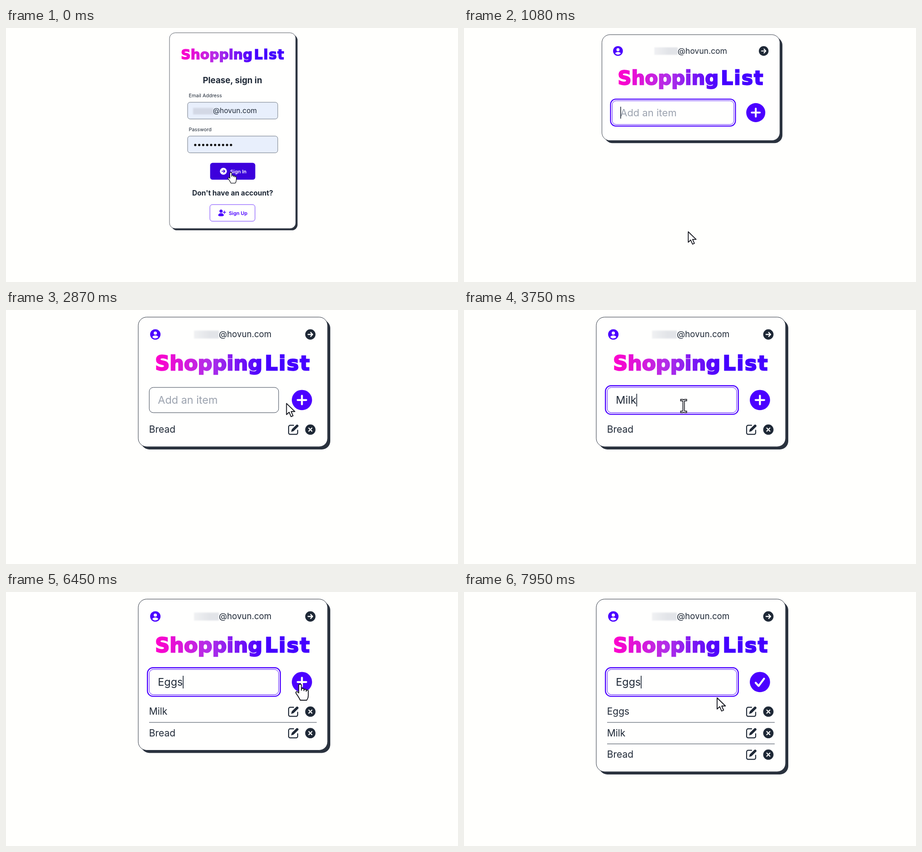
These frames come from a looping animation (998x561 px, 8000 ms). An HTML page:

```html
<!DOCTYPE html>
<html lang="en">
<head>
<meta charset="utf-8">
<title>Shopping List</title>
<style>
  html, body { margin: 0; width: 100%; height: 100%; overflow: hidden; background: #fffffd; }
  svg { display: block; width: 100vw; height: 100vh; }
  text { font-family: Inter, sans-serif; font-optical-sizing: none; fill: #1f2937; white-space: pre; }
  .title { font: bold 44.5px "DejaVu Sans", sans-serif; fill: url(#ink); stroke: url(#ink); stroke-width: 2.5; }
  .loose { letter-spacing: 2.5px; }
  .card { fill: #fffffe; stroke: #2a323e; }
  .shadow { fill: #2a323e; }
  .dark { fill: #1f2937; }
  .purple { fill: #4b00ff; }
  .white { fill: #fffffe; }
  .line { fill: none; stroke: #fffffe; stroke-linecap: round; stroke-linejoin: round; }
  .field { fill: #e8effc; stroke: #4b5563; stroke-width: .8; }
  .bold { font-weight: 700; text-anchor: middle; }
  .small { font-size: 10.9px; }
  .pointer { fill: #fffffe; stroke: #15171f; stroke-width: 1.9; stroke-linejoin: round; }
</style>
</head>
<body>
<svg viewBox="0 0 998 561">
  <defs>
    <linearGradient id="ink" gradientUnits="userSpaceOnUse" x1="331" x2="672" y1="0" y2="0">
      <stop offset="0" stop-color="#ff00cc"/>
      <stop offset=".34" stop-color="#b32fe8"/>
      <stop offset=".7" stop-color="#4500ff"/>
    </linearGradient>
    <linearGradient id="veil">
      <stop offset="0" stop-color="#f0f1f3"/>
      <stop offset=".6" stop-color="#e2e4e8"/>
    </linearGradient>
    <filter id="soft" x="-20%" y="-40%" width="140%" height="180%"><feGaussianBlur stdDeviation="1.4"/></filter>
    <g id="title">
      <text class="title" x="329.3" y="132.5">Shopping</text>
      <text class="title loose" x="571.5" y="132.5">List</text>
    </g>
    <path id="arrowRight" d="M-5 0H5M.8-4.4 5 0 .8 4.4" fill="none" stroke-linecap="round" stroke-linejoin="round"/>
    <g id="edit">
      <path d="M1-9.5H-6.5A3.5 3.5 0 0 0-10-6V7A3.5 3.5 0 0 0-6.5 10.5H6.5A3.5 3.5 0 0 0 10 7V1.5" fill="none" stroke="#1f2937" stroke-width="2.2" stroke-linecap="round"/>
      <path class="dark" d="M-4.5 5-3-.8 6.8-10.3Q9-12 11-10T10.8-6.2L1 3.4Z"/>
    </g>
    <g id="remove">
      <circle class="dark" r="11.4"/>
      <path class="line" stroke-width="2.3" d="M-3.4-3.4 3.4 3.4M3.4-3.4-3.4 3.4"/>
    </g>
    <path id="beamShape" d="M-5-13H-3Q0-13 0-10V10Q0 13-3 13H-5M5-13H3Q0-13 0-10M0 10Q0 13 3 13H5" fill="none" stroke-linecap="square"/>
  </defs>

  <g id="camera">
    <g id="signIn" transform="translate(500.5) scale(1.5) translate(-500.5)">
      <rect class="shadow" x="365" y="14.5" width="278.7" height="432.3" rx="12.5"/>
      <rect class="card" stroke-width=".8" x="361" y="10.6" width="278.7" height="432.3" rx="12.5"/>
      <use href="#title" transform="translate(500.5) scale(.6667) translate(-500.5 -28.5)"/>
      <text class="bold" font-size="18.7" x="500" y="122">Please, sign in</text>
      <text class="small" x="403.5" y="153">Email Address</text>
      <rect class="field" x="401" y="164" width="199" height="37" rx="5.5"/>
      <rect x="413" y="176.5" width="45" height="14.5" fill="#d3d8e5" filter="url(#soft)"/>
      <text font-size="15.6" x="457" y="188">@hovun.com</text>
      <text class="small" x="403.5" y="228">Password</text>
      <rect class="field" x="401" y="238.7" width="199" height="37" rx="5.5"/>
      <path d="M417.9 258.3h80" stroke="#111" stroke-width="5.2" stroke-linecap="round" stroke-dasharray="0 8.77"/>
      <rect x="450.7" y="297.8" width="99.7" height="37.3" rx="5.5" fill="#3d00dc"/>
      <circle class="white" cx="480" cy="316.4" r="7.7"/>
      <use href="#arrowRight" transform="translate(480 316.4) scale(.66)" stroke="#3d00dc" stroke-width="2.5"/>
      <text class="small" font-weight="600" x="495" y="320.6" style="fill:#fff">Sign In</text>
      <text class="bold" font-size="15.6" x="500.3" y="370.4">Don't have an account?</text>
      <rect x="450.2" y="390" width="99.6" height="36.8" rx="5.5" fill="#fffffe" stroke="#4b00ff" stroke-width=".8"/>
      <circle class="purple" cx="474.8" cy="404.5" r="3.5"/>
      <path class="purple" d="M468.5 413.5Q469.5 409 474.8 409T481 413.5Q481 415.8 474.8 415.8T468.5 413.5Z"/>
      <path d="M479.3 407h6M482.3 404v6" stroke="#4b00ff" stroke-width="1.4" stroke-linecap="round"/>
      <text class="small" font-weight="600" x="492" y="412.6" style="fill:#4b00ff">Sign Up</text>
    </g>

    <g id="app">
      <rect id="cardShadow" class="shadow" x="298" y="21.7" width="418" rx="18.7"/>
      <rect id="card" class="card" x="292" y="15.7" width="418" rx="18.7"/>
      <g transform="translate(329.7 54)">
        <circle class="purple" r="11.5"/>
        <circle class="white" cy="-3" r="3.6"/>
        <path class="white" d="M-6.7 5.7Q-4.5 2.3 0 2.3T6.7 5.7Q4 8.8 0 8.8T-6.7 5.7Z"/>
      </g>
      <rect x="415" y="45.5" width="55" height="17.5" fill="url(#veil)" filter="url(#soft)"/>
      <text font-size="18.7" x="470" y="60.3">@hovun.com</text>
      <circle class="dark" cx="672" cy="54" r="11.4"/>
      <use href="#arrowRight" transform="translate(672 54)" stroke="#fffffe" stroke-width="2.3"/>
      <use href="#title"/>
      <rect id="ring" x="312.3" y="167.2" width="293.4" height="63.2" rx="12.5" fill="none" stroke="#4b00ff" stroke-width="2.4"/>
      <rect id="input" x="316.3" y="171" width="285.6" height="55.8" rx="9" fill="#fffffe"/>
      <text id="entry" font-size="23.4" x="335.3" y="207.3"></text>
      <rect id="caret" y="185" width="1.7" height="28" fill="#1f2937"/>
      <circle class="purple" cx="653.4" cy="198.8" r="22.4"/>
      <path id="buttonIcon" class="line" stroke-width="4.3"/>
      <g id="rows"></g>
    </g>

    <g id="cursor">
      <path id="arrow" class="pointer" d="M.8.8V25.5L6.6 20.2 10.8 30 15.2 28 11 18.8H19.3Z"/>
      <path id="hand" class="pointer" transform="translate(-9.7 -1)" d="M7 21V4.5a3 3 0 0 1 6 0V15v-2a2.8 2.8 0 0 1 5.5 0v3-1.5a2.7 2.7 0 0 1 5 0v3-1a2.4 2.4 0 0 1 4.7 0V27q0 5-3.5 10H10.5Q8.5 33 5 27.5L1.2 22q-1.3-3 1-3.8 2-.7 4.8 2.8Z"/>
      <g id="beam">
        <use href="#beamShape" stroke="#15171f" stroke-width="5"/>
        <use href="#beamShape" stroke="#fffffe" stroke-width="1.7"/>
      </g>
    </g>
  </g>
</svg>

<script>
const LOOP = 8000, CENTER = 500.5, ROW = 47.5;
const SWITCH = 540, ZOOM_TIME = 742, EDITING = 7450;
const $ = id => document.getElementById(id);
const show = (id, on) => $(id).setAttribute('visibility', on ? 'inherit' : 'hidden');
const smooth = x => x * x * (3 - 2 * x);
const clamp = x => Math.min(1, Math.max(0, x));

// [time, entry, focused, list]
const breadList = ['Bread'], milkList = ['Milk', 'Bread'], eggList = ['Eggs', 'Milk', 'Bread'];
const states = [
  [0, '', true, []],
  [1130, 'B', true, []], [1230, 'Br', true, []], [1330, 'Bre', true, []], [1540, 'Brea', true, []], [2290, 'Bread', true, []],
  [2700, '', false, breadList], [3120, '', true, breadList],
  [3290, 'M', true, breadList], [3540, 'Mi', true, breadList], [3640, 'Mil', true, breadList], [3750, 'Milk', true, breadList],
  [4640, '', false, milkList], [5000, '', true, milkList],
  [5500, 'E', true, milkList], [5660, 'Eg', true, milkList], [5750, 'Egg', true, milkList], [5950, 'Eggs', true, milkList],
  [6500, '', false, eggList], [EDITING, 'Eggs', true, eggList]
];
const caretOff = [[1830, 2080], [4000, 4290], [5290, 5500], [7700, 7950]];

// [time, x, y] of the pointer tip
const route = [
  [0, 494, 478], [2330, 494, 478], [2600, 650, 204], [2790, 650, 204], [3080, 485, 212],
  [4270, 485, 212], [4540, 650, 204], [4790, 650, 204], [5020, 485, 212],
  [6180, 485, 212], [6430, 649, 203], [6770, 649, 203], [6990, 579, 283], [7200, 636, 266],
  [7440, 636, 266], [7700, 558, 233], [LOOP, 558, 233]
];

function pointerAt(t) {
  const i = route.findIndex(k => k[0] > t);
  const [t0, x0, y0] = route[i - 1], [t1, x1, y1] = route[i];
  const p = smooth((t - t0) / (t1 - t0));
  return [x0 + (x1 - x0) * p, y0 + (y1 - y0) * p];
}

function pointerShape(t, x, y, list) {
  if (t < SWITCH) return t < 40 ? 'hand' : 'arrow';
  if (Math.hypot(x - 653.4, y - 198.8) < 22.4) return 'hand';
  if (x > 316 && x < 602 && y > 171 && y < 227) return 'beam';
  const overEdit = list.length && Math.abs(x - 634) < 13 && Math.abs(y - 264) < 13;
  return overEdit ? 'hand' : 'arrow';
}

function rowMarkup(name, i) {
  const y = 264.2 + i * ROW;
  const divider = i ? `<path d="M316 ${y - 23.7}H686" stroke="#374151"/>` : '';
  return `${divider}<text font-size="21" x="315.7" y="${y + 7.2}">${name}</text>
    <use href="#edit" x="634" y="${y}"/><use href="#remove" x="672" y="${y}"/>`;
}

let current;
function applyState(state) {
  if (state === current) return;
  current = state;
  const [time, entry, focused, list] = state;
  const height = list.length ? 238.8 + ROW * list.length : 248.8;
  for (const id of ['card', 'cardShadow']) $(id).setAttribute('height', height);
  $('rows').innerHTML = list.map(rowMarkup).join('');
  $('entry').textContent = entry || 'Add an item';
  $('entry').style.fill = entry ? '#1f2937' : '#9ca3af';
  $('input').setAttribute('stroke', focused ? '#4b00ff' : '#374151');
  show('ring', focused);
  $('caret').setAttribute('x', 335.2 + (entry ? $('entry').getComputedTextLength() : 0));
  $('buttonIcon').setAttribute('d', time >= EDITING
    ? 'M644 200.5 650.5 207.5 662.5 191.5'
    : 'M643.9 198.8H662.9M653.4 189.3V208.3');
}

function draw(now) {
  const t = now % LOOP;
  const zoom = 2 / 3 + smooth(clamp((t - SWITCH) / ZOOM_TIME)) / 3;
  $('camera').setAttribute('transform', `translate(${CENTER * (1 - zoom)}) scale(${zoom})`);
  $('signIn').style.display = t < SWITCH ? '' : 'none';
  $('app').style.display = t < SWITCH ? 'none' : '';

  const state = states.findLast(s => s[0] <= t);
  applyState(state);
  show('caret', state[2] && !caretOff.some(([a, b]) => t >= a && t < b));

  const [x, y] = pointerAt(t);
  $('cursor').setAttribute('transform', `translate(${x} ${y})`);
  const shape = pointerShape(t, x, y, state[3]);
  for (const id of ['arrow', 'hand', 'beam']) show(id, id === shape);
  requestAnimationFrame(draw);
}
requestAnimationFrame(draw);
</script>
</body>
</html>
```
